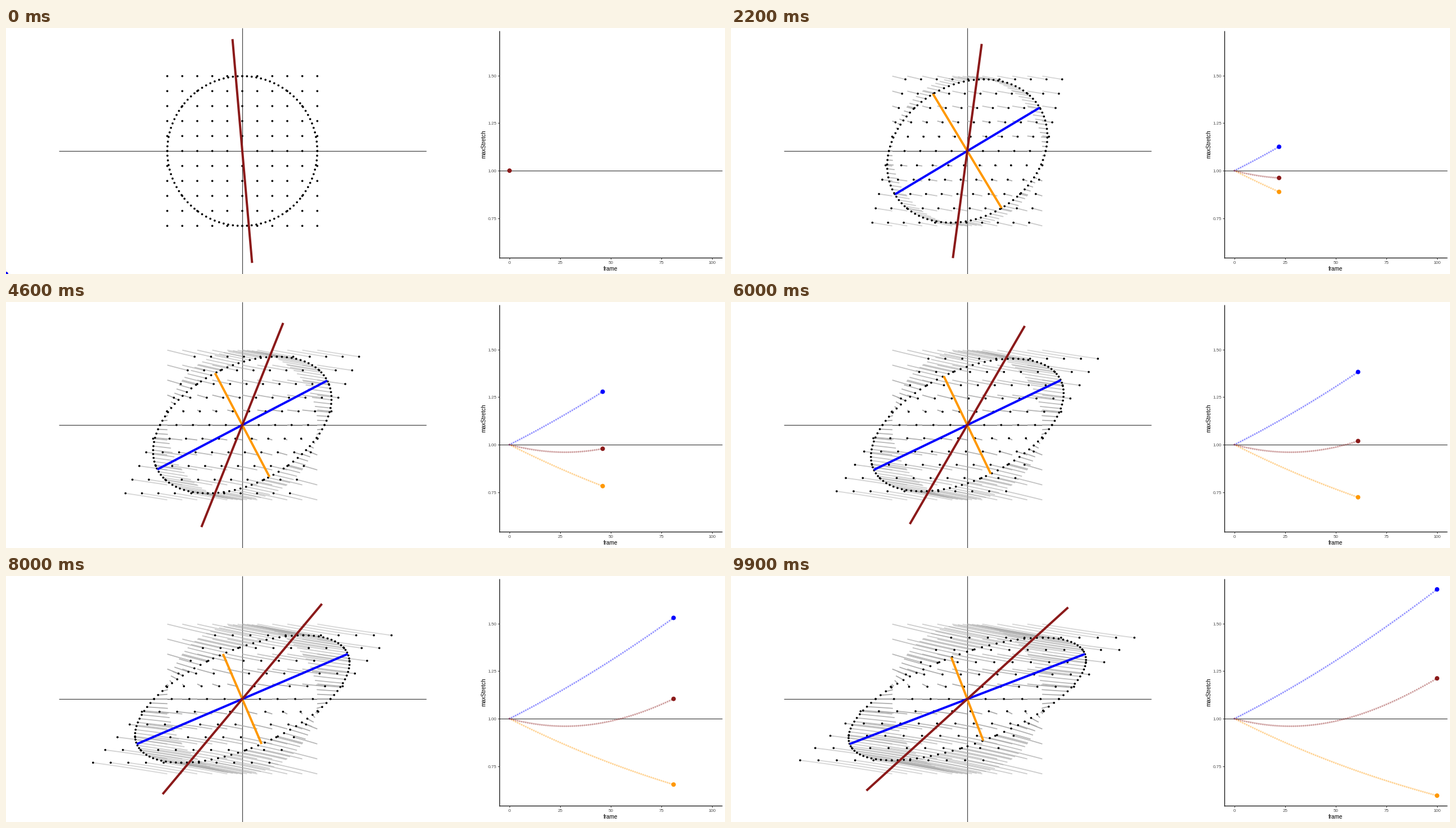
These frames come from a looping animation (1278 by 438 pixels, 10000 ms). A matplotlib script:

```python
import numpy as np
import matplotlib.pyplot as plt
from matplotlib.animation import FuncAnimation
from matplotlib.collections import LineCollection

W, H = 1278, 438
FRAMES, STEPS = 100, 100
CENTER, UNIT = np.array([420, 219]), 133.33
STRETCH, SHEAR = 0.2, 1.0
RED, BLUE, ORANGE = "#8B1A1A", "#0000FF", "#FF9800"
GREY = 169 / 255

plt.rcParams["font.family"] = "Liberation Sans"


def gradient(t):
    """Deformation gradient of combined pure and simple shear."""
    k = STRETCH * t / STEPS
    return np.array([[np.exp(k), SHEAR * np.sinh(k) / STRETCH],
                     [0, np.exp(-k)]])


def to_px(p):
    return CENTER + UNIT * np.asarray(p) * [1, -1]


def chart_px(t, stretch):
    return np.column_stack([895 + 3.6 * np.atleast_1d(t),
                            254 - 338.7 * (np.atleast_1d(stretch) - 1)])


# material points: square grid and unit circle
side = np.linspace(-1, 1, 11)
grid = np.stack(np.meshgrid(side, side), -1).reshape(-1, 2)
angle = np.linspace(0, 2 * np.pi, 100, endpoint=False)
points = np.vstack([grid, np.column_stack([np.cos(angle), np.sin(angle)])])

marker = 1.5 * np.array([np.cos(np.radians(95)), np.sin(np.radians(95))])

# stretch histories
times = np.arange(STEPS + 1)
tensors = [gradient(t) for t in times]
major = np.array([np.linalg.svd(F)[1][0] for F in tensors])
history = {
    ORANGE: 1 / major,
    BLUE: major,
    RED: np.array([np.linalg.norm(F @ marker) for F in tensors]) / 1.5,
}

fig = plt.figure(figsize=(W / 72, H / 72), dpi=72, facecolor="white")
ax = fig.add_axes([0, 0, 1, 1])
ax.set_xlim(0, W)
ax.set_ylim(H, 0)
ax.axis("off")


def rule(x, y, color, lw=1.2):
    ax.plot(x, y, color=color, lw=lw, solid_capstyle="butt", zorder=1)


def label(x, y, text, size=8, color="#4D4D4D", **kw):
    kw = {"ha": "center", "va": "baseline", **kw}
    ax.text(x, y, text, fontsize=size, color=color, **kw)


def dots(size, color, zorder, alpha=1):
    return ax.scatter([], [], s=size ** 2, c=color, alpha=alpha,
                      edgecolors="none", zorder=zorder)


# static axes
rule([93.5, 746.5], [219, 219], "#404040")
rule([420, 420], [0, H], "#404040")
rule([877, 1273], [254, 254], "#404040")
rule([877, 877], [5, 409.5], "black")
rule([876.5, 1273], [409, 409], "black")
for v in (0.75, 1.0, 1.25, 1.5):
    y = chart_px(0, v)[0, 1]
    rule([874, 877], [y, y], "#333333", 1)
    label(872.3, y + 3, f"{v:.2f}", ha="right")
for v in range(0, 101, 25):
    x = 895 + 3.6 * v
    rule([x, x], [409, 412], "#333333", 1)
    label(x, 420, str(v))
label(1074.5, 431.7, "frame", 10, "black")
label(852.7, 207, "maxStretch", 10, "black", rotation=90,
      rotation_mode="anchor")

# slow points leave denser trails
speed = UNIT / STEPS * np.hypot(STRETCH * points[:, 0] + SHEAR * points[:, 1],
                                STRETCH * points[:, 1])
density = 1 - 0.6 ** (2 / np.maximum(speed, 0.1))
trail_colors = np.column_stack([np.full((len(points), 3), GREY), density])
trails = LineCollection([], colors=trail_colors, linewidths=1.8, zorder=2)
ax.add_collection(trails)

body = dots(3.7, "black", 3)
axes_lines, tails, heads = {}, {}, {}
for i, c in enumerate(history):
    axes_lines[c], = ax.plot([], [], color=c, lw=4, solid_capstyle="butt",
                             zorder=4 + i)
    tails[c] = dots(3.2, c, 2 + 0.1 * i, 0.4)
    heads[c] = dots(8, c, 4 + i)


def update(frame):
    t = round(frame * STEPS / (FRAMES - 1))
    F = gradient(t)
    body.set_offsets(to_px(points @ F.T))

    path = np.array([to_px(points @ gradient(s).T)
                     for s in np.linspace(0, t, 9)])
    trails.set_segments(list(path.transpose(1, 0, 2)) if t else [])

    dirs, lengths, _ = np.linalg.svd(F)
    ends = {BLUE: dirs[:, 0] * lengths[0],
            ORANGE: dirs[:, 1] * lengths[1],
            RED: F @ marker}
    for c, values in history.items():
        # principal axes are undefined before any strain
        shown = c == RED or t > 0
        line = to_px([ends[c], -ends[c]]) if shown else np.empty((0, 2))
        axes_lines[c].set_data(line[:, 0], line[:, 1])
        tails[c].set_offsets(chart_px(times[:t], values[:t]))
        heads[c].set_offsets(chart_px(t, values[t]) if shown
                             else np.empty((0, 2)))


anim = FuncAnimation(fig, update, frames=FRAMES, interval=100, repeat=True,
                     repeat_delay=0)
plt.show()
```
